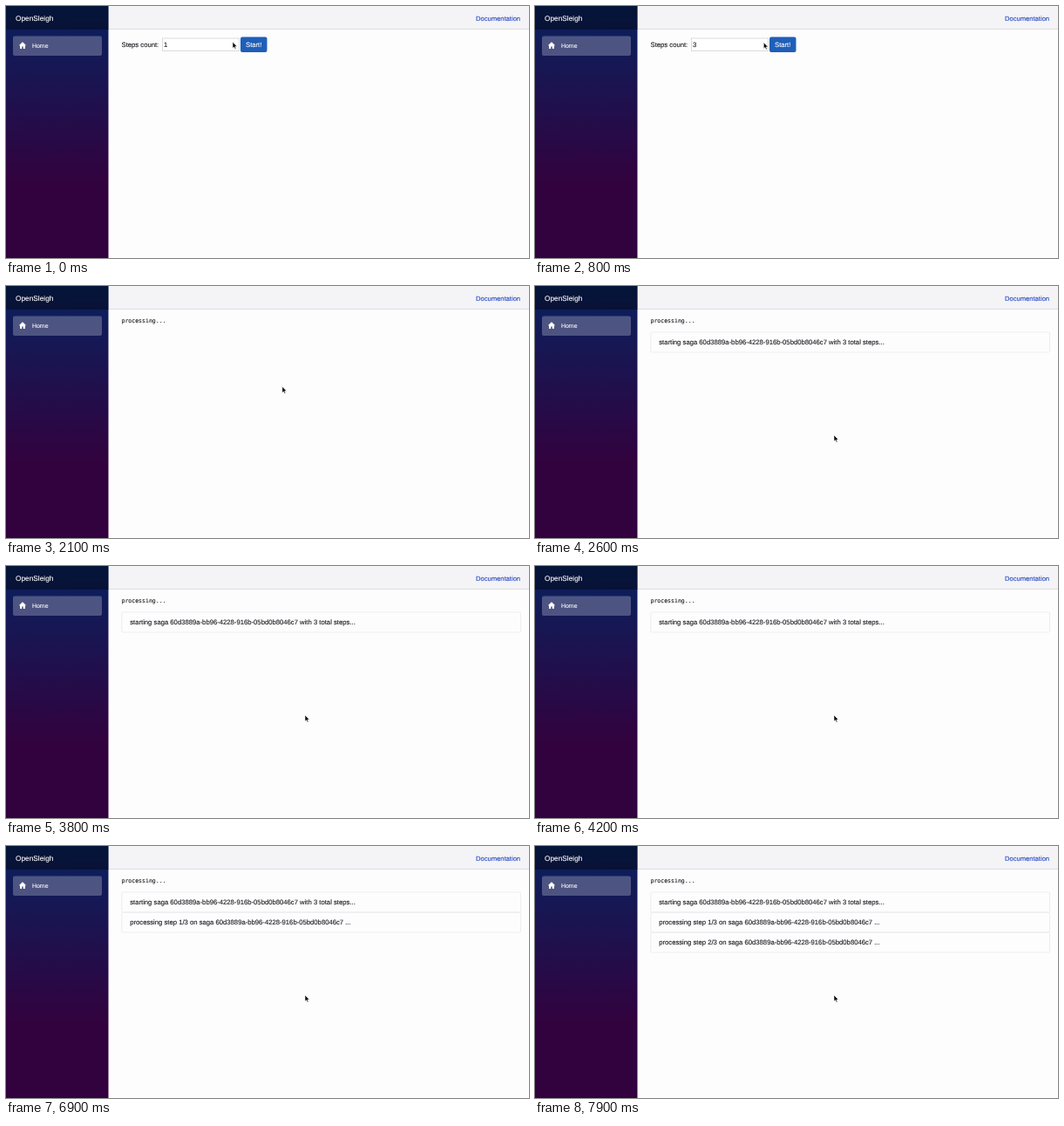
Animation, 600 px wide and 289 px high, one loop 8000 ms. Source, as an HTML page:

```html
<!DOCTYPE html>
<html lang="en">
<head>
<meta charset="utf-8">
<title>Saga steps</title>
<style>
  html, body { margin: 0; width: 100%; height: 100%; overflow: hidden; background: #fefdfe; }
  svg { display: block; width: 600px; height: 289px; }
  text {
    font: 7.7px "Liberation Sans", Arial, sans-serif;
    fill: #1c1c20; stroke: #1c1c20; stroke-width: .12;
    text-rendering: geometricPrecision;
    white-space: pre;
  }
  .light { fill: #fff; stroke: #fff; }
  .brand { font-size: 8.3px; }
  .nav { font-size: 6.95px; }
  .link { fill: #2448c4; stroke: #2448c4; font-size: 7.6px; }
  .mono { font: 6.53px "DejaVu Sans Mono", "Liberation Mono", monospace; }
  .row rect { fill: none; stroke: #e6e5e8; stroke-width: .7; }
</style>
</head>
<body>
<svg viewBox="0 0 600 289">
  <defs>
    <linearGradient id="side" x1="0" y1="0" x2="0" y2="1">
      <stop offset="0" stop-color="#08225f"/>
      <stop offset=".7" stop-color="#32023e"/>
    </linearGradient>
  </defs>
  <rect width="600" height="289" fill="#fefdfe"/>
  <rect x="117" width="483" height="26.5" fill="#f4f3f5"/>
  <rect x="117" y="26.3" width="483" height=".8" fill="#d5d4d7"/>
  <text class="link" x="539" y="16.6">Documentation</text>

  <rect width="117.5" height="289" fill="url(#side)"/>
  <rect width="117.5" height="27" fill="#000" fill-opacity=".4"/>
  <text class="light brand" x="11" y="17">OpenSleigh</text>
  <rect x="8" y="34.5" width="102" height="22.5" rx="2" fill="#fff" fill-opacity=".25"/>
  <path d="M19 41.3 14.8 45.3H16V49H18.2V46.5H19.8V49H22V45.3H23.2Z" fill="#fff"/>
  <text class="light nav" x="30" y="48">Home</text>

  <g id="form">
    <text x="132.5" y="47">Steps count:</text>
    <rect x="179.5" y="37" width="88" height="14.5" fill="#fff" stroke="#d2d1d5" stroke-width=".8"/>
    <text id="count" x="181" y="47">1</text>
    <rect x="269" y="35.5" width="30.5" height="17.5" rx="2" fill="#1f5fb8"/>
    <text class="light" x="275" y="47">Start!</text>
  </g>
  <text id="busy" class="mono" x="132.5" y="42.3">processing...</text>
  <g id="rows"></g>
  <path id="cursor" d="M0 0V7.2L1.7 5.7 2.8 8.2 4 7.7 2.9 5.2H5.1Z" fill="#000" stroke="#fff" stroke-width=".6"/>
</svg>
<script>
const LOOP = 8000, START = 1400;
const $ = id => document.getElementById(id);
const saga = "60d3889a-bb96-4228-916b-05bd0b8046c7";
const rows = [
  [2200, `starting saga ${saga} with 3 total steps...`],
  [4900, `processing step 1/3 on saga ${saga} ...`],
  [7600, `processing step 2/3 on saga ${saga} ...`]
];
// time, x, y of the pointer tip
const path = [
  [0, 260, 41.3], [700, 260, 41.3], [1200, 282, 45.3], [1700, 282, 45.3],
  [1900, 312, 105], [2000, 312, 105], [2400, 343, 171], [LOOP, 343, 171]
];

$("rows").innerHTML = rows.map(([, label], i) => `<g class="row">
  <rect x="132.8" y="${53 + i * 23}" width="457.7" height="23" rx="1.5"/>
  <text x="142.2" y="${67.2 + i * 23}">${label}</text></g>`).join("");
const rowNodes = [...document.querySelectorAll(".row")];

function show(node, on) {
  node.style.display = on ? "" : "none";
}

function pointer(t) {
  const i = path.findIndex(p => p[0] > t);
  const [t0, x0, y0] = path[i - 1], [t1, x1, y1] = path[i];
  const k = (t - t0) / (t1 - t0), e = k * k * (3 - 2 * k);
  return `translate(${x0 + (x1 - x0) * e} ${y0 + (y1 - y0) * e})`;
}

function draw(now) {
  const t = Math.floor(now % LOOP / 100) * 100;
  show($("form"), t < START);
  show($("busy"), t >= START);
  $("count").textContent = t < 200 ? 1 : t < 500 ? 2 : 3;
  rows.forEach(([at], i) => show(rowNodes[i], t >= at));
  $("cursor").setAttribute("transform", pointer(t));
}

const begin = performance.now();
function tick() {
  draw(performance.now() - begin);
  requestAnimationFrame(tick);
}
tick();
</script>
</body>
</html>
```
